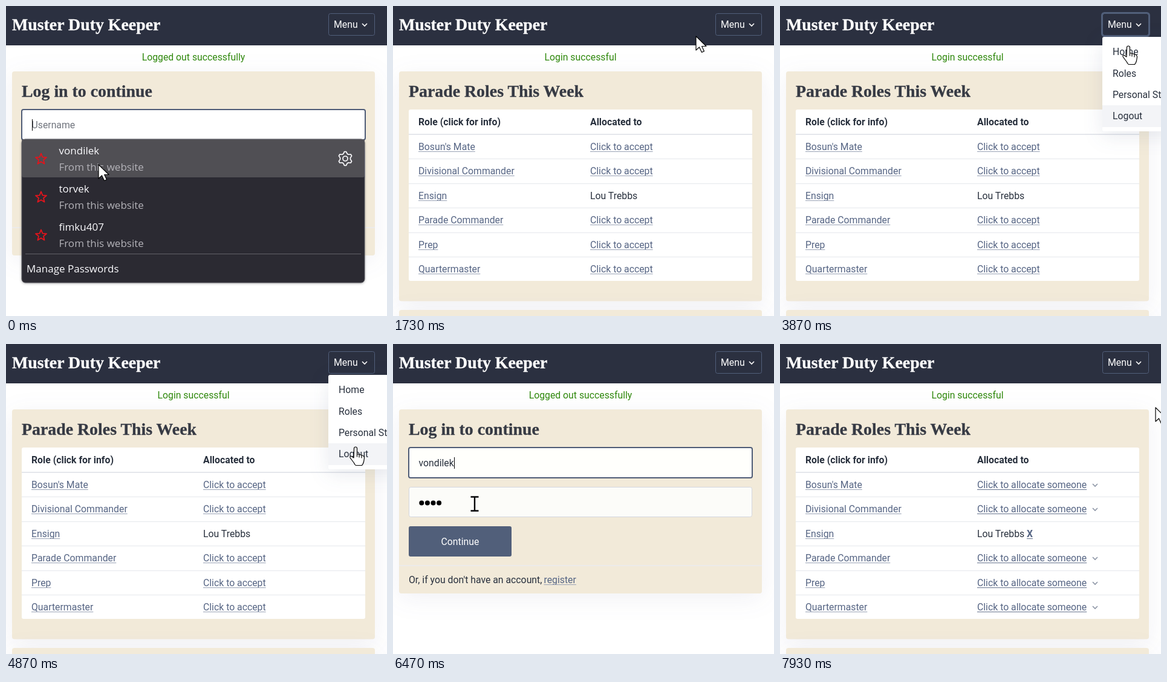
Animation, 630 px wide and 512 px high, one loop 8000 ms. Source, as an HTML page:

```html
<!DOCTYPE html>
<html lang="en">
<head>
<meta charset="utf-8">
<title>Duty planner demo</title>
<style>
html, body { margin: 0; width: 100%; height: 100%; overflow: hidden; background: #fff; }
svg { display: block; }
text { font: 15.8px Roboto, sans-serif; fill: #28303d; white-space: pre; }
.h { font: bold 27.85px "Liberation Serif", serif; fill: #363a44; stroke: #363a44; stroke-width: .3; }
.w { fill: #fff; }
.h.w { stroke: #fff; }
.b { font-weight: bold; }
.ok { fill: #2f880c; text-anchor: middle; }
.u { fill: #566584; }
.hint { fill: #70747d; }
.pop { font: 17px "Open Sans", sans-serif; fill: #fbfbfe; }
.sub { fill: #b4b3b9; }
.card { fill: #f2ead9; filter: drop-shadow(0 8px 20px rgba(50, 60, 110, .07)); }
.ptr { fill: #fff; stroke: #000; stroke-width: 1.2; stroke-linejoin: round; }
</style>
</head>
<body>
<svg id="stage" width="630" height="512" viewBox="0 0 630 512"></svg>
<script>
const stage = document.getElementById('stage');
const $ = id => document.getElementById(id);

// markup helpers
const text = (x, y, s, cls = '', id = '') => `<text x="${x}" y="${y}" class="${cls}" id="${id}">${s}</text>`;
const rect = (x, y, w, h, attrs) => `<rect x="${x}" y="${y}" width="${w}" height="${h}" ${attrs}/>`;
const path = (d, attrs) => `<path d="${d}" ${attrs}/>`;
const group = (id, ...parts) => `<g id="${id}">${parts.join('')}</g>`;
const chevron = (x, y, color) => path(`M${x - 4} ${y - 2}l4 4l4 -4`, `fill="none" stroke="${color}" stroke-width="1.6"`);
const polar = (cx, cy, n, radius, turn = 0) => 'M' + Array.from({length: n}, (_, i) => {
  const a = (i + turn) / n * 2 * Math.PI - Math.PI / 2, r = radius(i);
  return (cx + r * Math.cos(a)).toFixed(2) + ' ' + (cy + r * Math.sin(a)).toFixed(2);
}).join('L') + 'Z';

const field = y => rect(26.5, y + .5, 567, 49, 'rx="3" fill="#fcfcfc" stroke="#d3d6df"');
const tint = y => rect(27, y + 1, 566, 48, 'rx="2" fill="#fffacb" class="tint"');

const login = group('login',
  rect(10, 108, 600, 304, 'rx="4" class="card"'),
  text(26, 150, 'Log in to continue', 'h'),
  field(171), field(236),
  rect(26, 171, 568, 50, 'rx="3" fill="#fff" stroke="#4f5c77" stroke-width="2" id="focus"'),
  tint(171), tint(236),
  text(42.5, 202, 'Username', 'hint', 'user'),
  text(42.5, 267, 'Password', 'hint', 'pass'),
  group('dots', ...[0, 1, 2, 3].map(i => `<circle cx="${47.3 + i * 9.6}" cy="262.5" r="4"/>`)),
  rect(0, 187, 1, 19, 'fill="#000" id="caret"'),
  rect(25, 300, 172, 52, 'rx="4" fill="none" stroke="#515f7a" stroke-opacity=".4" stroke-width="2" id="pressed"'),
  rect(26, 301, 170, 50, 'rx="3" fill="#515f7a"'),
  '<g text-anchor="middle">', text(111, 332, 'Continue', 'w'), '</g>',
  rect(10, 365, 600, 2, 'fill="#ecebea"'),
  text(26, 395, "Or, if you don't have an account,"),
  text(249.5, 395, 'register', 'u'));

const popup = group('popup',
  rect(26, 220, 567, 237, 'rx="6" fill="#2b2a32" style="filter:drop-shadow(0 1px 2px rgba(0,0,0,.35))"'),
  group('hover',
    rect(26, 220, 567, 63, 'fill="#504f54" rx="3"'),
    path(polar(561, 252, 24, i => i % 4 < 2 ? 11.5 : 8.5, -.5), 'fill="none" stroke="#fbfbfe" stroke-width="1.7" stroke-linejoin="round"'),
    '<circle cx="561" cy="252" r="4" fill="none" stroke="#fbfbfe" stroke-width="1.7"/>'),
  ...['vondilek', 'torvek', 'fimku407'].map((name, i) =>
    path(polar(58, 253 + i * 63, 10, k => k % 2 ? 4.2 : 9.5), 'fill="none" stroke="#e3141c" stroke-width="1.8" stroke-linejoin="round"') +
    text(87.5, 245 + i * 63, name, 'pop') + text(87.5, 272 + i * 63, 'From this website', 'pop sub')),
  rect(32, 409, 555, 1, 'fill="#626168"'),
  text(34, 440, 'Manage Passwords', 'pop'),
  rect(26, 220, 567, 237, 'rx="6" fill="none" stroke="#5d5c64"'));

const roles = ["Bosun's Mate", 'Divisional Commander', 'Ensign', 'Parade Commander', 'Prep', 'Quartermaster'];
const PITCH = 40.4;
const perRow = fn => roles.map((role, i) => fn(role, Math.round(238 + i * PITCH), i));
const free = fn => perRow((role, y, i) => i === 2 ? '' : fn(y)).join('');

const home = group('home',
  rect(10, 108, 600, 379.5, 'rx="4" class="card"'),
  rect(10, 502, 600, 40, 'rx="4" class="card"'),
  text(26, 150, 'Parade Roles This Week', 'h'),
  rect(26, 171, 568, 283, 'rx="3" fill="#fff"'),
  text(42, 197, 'Role (click for info)', 'b'),
  text(326, 197, 'Allocated to', 'b'),
  rect(26, 211, 568, 2, 'fill="#e5e7ec"'),
  ...perRow((role, y, i) => text(42, y, role, 'u') +
    (i < 5 ? rect(26, Math.round(252.3 + i * PITCH), 568, 1, 'fill="#e5e7ec"') : '')),
  text(326, 319, 'Lou Trebbs'),
  group('member', free(y => text(326, y, 'Click to accept', 'u'))),
  group('admin',
    free(y => text(326, y, 'Click to allocate someone', 'u dark') + chevron(521, y - 5, '#8d96a6')),
    text(408, 319, 'X', 'u b dark')));

const header =
  rect(0, 0, 630, 65, 'fill="#2b3040"') +
  text(10, 40, 'Muster Duty Keeper', 'h w') +
  rect(533.5, 12.5, 76, 36, 'rx="3" fill="none" stroke="#515f7a"') +
  rect(532.5, 11.5, 78, 38, 'rx="4" fill="none" stroke="#515f7a" stroke-width="3" id="ring"') +
  text(542, 36, 'Menu', 'w') + chevron(593, 31, '#fff');

const menu = group('menu',
  rect(533, 51, 140, 156, 'rx="3" fill="#fff" style="filter:drop-shadow(0 8px 16px rgba(40,55,95,.1))"'),
  rect(533, 164, 140, 36, 'fill="#f3f4f7" id="picked"'),
  text(550, 81, 'Home'), text(550, 117, 'Roles'), text(550, 152, 'Personal Stats'), text(550, 187, 'Logout'));

const pointers =
  path('M0 0V23L5.5 18L9.5 26.5L13.5 24.7L9.7 16.5H17Z', 'class="ptr" id="arrow"') +
  path('M-2.5 2.5a2.5 2.5 0 0 1 5 0v9l7.5 2q4.5 1 4.5 5l-1 6q-1 4 -3 6h-10q-2 -1 -3 -4l-6 -8q-2 -4 2 -3l3.5 2.5ZM6 12.5v5M10 13.5v5M2.5 11.5v5', 'class="ptr" id="hand"') +
  path('M-6.5 -11.5H6.5M-6.5 11.5H6.5M0 -11.5V11.5', 'fill="none" stroke="#fff" stroke-width="2.4" style="mix-blend-mode:difference" id="beam"');

stage.innerHTML = rect(0, 0, 630, 512, 'fill="#fff"') + login + home + header +
  text(310, 90, '', 'ok', 'msg') + popup + menu + pointers;

// underline links while everything is still laid out
for (const el of stage.querySelectorAll('.u')) {
  el.insertAdjacentHTML('afterend', rect(el.getAttribute('x'), +el.getAttribute('y') + 2,
    el.getComputedTextLength(), 1, `fill="${el.matches('.dark') ? '#66738d' : '#99a2b5'}"`));
}

// pointer track: time, x, y, shape
const track = [
  [0, 153, 262, 'arrow'], [333, 148, 362, 'arrow'], [466, 148, 362, 'beam'], [600, 143, 358, 'beam'],
  [733, 135, 335, 'hand'], [933, 130, 330, 'hand'], [1000, 150, 310, 'arrow'], [1267, 470, 24, 'arrow'],
  [1467, 518, 44, 'arrow'], [1733, 501, 50, 'arrow'], [1933, 560, 34, 'hand'], [2200, 574, 33, 'hand'],
  [2467, 576, 60, 'hand'], [2933, 575, 188, 'hand'], [3200, 582, 186, 'hand'], [3867, 576, 66, 'hand'],
  [4133, 572, 26, 'hand'], [4333, 574, 40, 'hand'], [4733, 578, 170, 'hand'], [5132, 578, 170, 'arrow'],
  [5667, 180, 205, 'beam'], [5800, 169, 208, 'beam'], [5866, 166, 212, 'arrow'], [6000, 166, 212, 'arrow'],
  [6267, 137, 254, 'arrow'], [6400, 135, 258, 'arrow'], [6466, 135, 264, 'beam'], [6600, 130, 305, 'hand'],
  [6867, 122, 338, 'hand'], [7000, 128, 336, 'arrow'], [7733, 626, 106, 'arrow'], [7933, 621, 105, 'arrow'],
  [8000, 621, 105, 'arrow']
];

const clamp = v => Math.max(0, Math.min(1, v));
const show = (id, on) => $(id).style.display = on ? '' : 'none';

function pointer(t) {
  const i = track.findIndex((k, n) => t >= k[0] && t < track[n + 1][0]);
  const [t0, x0, y0, shape] = track[i], [t1, x1, y1] = track[i + 1];
  const p = (t - t0) / (t1 - t0), e = p * p * (3 - 2 * p);
  return {x: x0 + (x1 - x0) * e, y: y0 + (y1 - y0) * e, shape};
}

function draw(t) {
  const {x, y, shape} = pointer(t);
  const first = t < 1330, onLogin = first || t > 5130 && t < 7795;
  const fillAt = first ? 466 : 6466, clickAt = first ? 933 : 6930;
  const filled = t >= fillAt;
  const focus = t >= clickAt ? 0 : first ? 1 : clamp((t - 5767) / 133);

  show('login', onLogin);
  show('home', !onLogin);
  $('msg').textContent = onLogin ? 'Logged out successfully' : 'Login successful';
  show('member', t < 7000);
  show('admin', t >= 7000);

  $('focus').style.opacity = focus;
  const yellow = filled ? clamp((t - fillAt + 8) / 133) : 0;
  stage.querySelectorAll('.tint').forEach(el => el.style.opacity = yellow);
  $('user').textContent = !filled ? 'Username' : first ? 'fimku407' : 'vondilek';
  $('user').setAttribute('class', filled ? '' : 'hint');
  show('pass', !filled);
  show('dots', filled);
  show('pressed', t >= clickAt);

  const since = filled ? fillAt : first ? -300 : 5790;
  show('caret', focus > 0 && (t - since) % 1000 < 500);
  if (onLogin) $('caret').setAttribute('x', filled ? Math.round(43 + $('user').getComputedTextLength()) : 43);

  const open = t < 466 || t >= 5866 && t < 6466;
  const row = Math.floor((y - 220) / 63);
  show('popup', open);
  show('hover', row >= 0 && row < 3);
  $('hover').setAttribute('transform', `translate(0 ${row * 63})`);

  show('ring', t >= 2199 && t < 4799);
  show('menu', t >= 2266 && t < 5130);
  show('picked', t >= 2866);

  for (const id of ['arrow', 'hand', 'beam']) show(id, id === shape);
  $(shape).setAttribute('transform', `translate(${Math.round(x)} ${Math.round(y)})`);
}

// fifteen steps a second
const STEP = 200 / 3;
function tick() {
  const n = Math.floor((performance.now() % 8000 + 3.4) / STEP) % 120;
  draw(n * STEP);
  requestAnimationFrame(tick);
}
tick();
</script>
</body>
</html>
```
